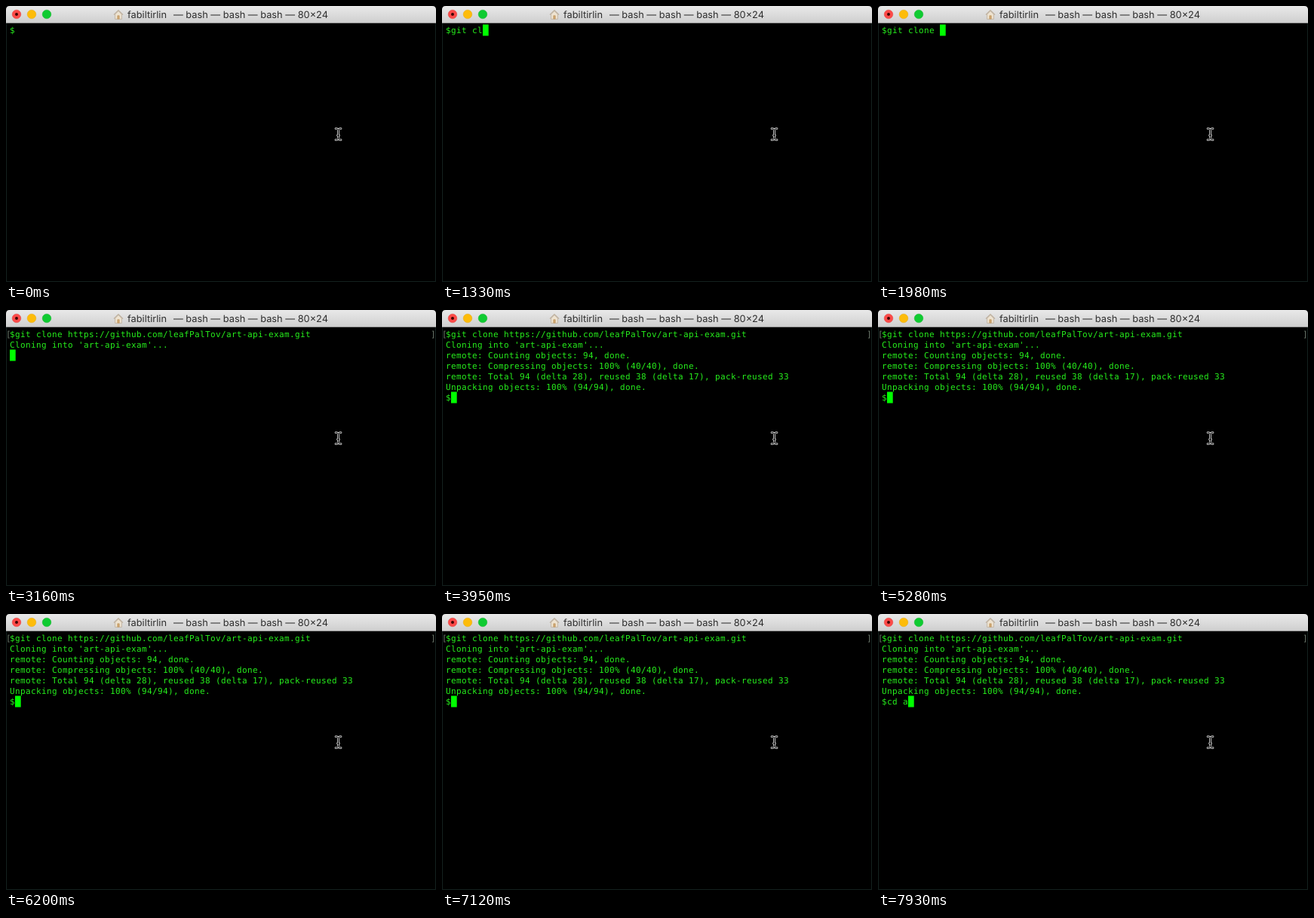
Recreate the animation shown at these times as an HTML page. Size 570 by 366 pixels, loop 8 s.

```html
<!DOCTYPE html>
<html lang="en">
<head>
<meta charset="utf-8">
<title>Terminal</title>
<style>
  html, body { margin: 0; width: 100%; height: 100%; overflow: hidden; background: #000; }
  svg { display: block; }
  text { white-space: pre; text-rendering: geometricPrecision; }
  .title { font: 12.8px Inter, Roboto, sans-serif; fill: #2e2e2e; }
  .term { font: 11px "DejaVu Sans Mono", monospace; letter-spacing: .378px; fill: #26ee1c; }
  .mark { fill: #707c70; }
</style>
</head>
<body>
<svg width="570" height="366" viewBox="0 0 570 366">
  <defs>
    <linearGradient id="bar" x1="0" y1="0" x2="0" y2="1">
      <stop offset="0" stop-color="#e9e9e9"/>
      <stop offset="1" stop-color="#cfcfcf"/>
    </linearGradient>
    <path id="beam" d="M437 162.5Q440.5 162.3 440.5 165Q440.5 162.3 444 162.5M440.5 165V175M437 177.5Q440.5 177.7 440.5 175Q440.5 177.7 444 177.5M439.5 171.5H441.5"/>
  </defs>
  <rect width="570" height="366"/>
  <path d="M.5 22V365.5H569.5V22" fill="none" stroke="#14211e"/>
  <path d="M0 22V5Q0 0 5 0H565Q570 0 570 5V22Z" fill="url(#bar)"/>
  <path d="M0 22.5H570" stroke="#8c8c8c"/>

  <g stroke-width=".5">
    <circle cx="14" cy="11" r="5.8" fill="#fc4a48" stroke="#e2423f"/>
    <circle cx="34" cy="11" r="5.8" fill="#fdbc0a" stroke="#e6a80f"/>
    <circle cx="54" cy="11" r="5.8" fill="#0fcb31" stroke="#14b52d"/>
  </g>
  <circle cx="14" cy="11" r="2" fill="#3f0403"/>

  <g stroke="#b9ad9e" stroke-width=".8" stroke-linejoin="round">
    <path d="M144.6 11V17.4H153.4V11L149 6.6Z" fill="#eee3d0"/>
    <path d="M142.9 11.6L149 5.6L155.1 11.6" fill="none" stroke="#bdae9b" stroke-width="1.1"/>
    <path d="M147.8 17.2V12.8H150.2V17.2Z" fill="#cfa56c" stroke="#c39f70"/>
  </g>
  <text class="title" x="161" y="16">fabiltirlin</text>
  <text class="title" x="427" y="16" text-anchor="end">— bash — bash — bash — 80×24</text>

  <g id="marks" class="term">
    <text class="mark" x="0" y="36">[</text>
    <text class="mark" x="563" y="36">]</text>
  </g>
  <g id="lines" class="term"></g>
  <rect id="caret" width="7.7" height="15" fill="#00ff00"/>

  <g fill="none" stroke-linecap="round" stroke-linejoin="round">
    <use href="#beam" stroke="#e4e4e4" stroke-width="2.7"/>
    <use href="#beam" stroke="#000" stroke-width="1"/>
  </g>
</svg>
<script>
const LOOP = 8000, COL = 7, ROW = 14, LEFT = 5, TOP = 25;
const clone = 'git clone https://github.com/leafPalTov/art-api-exam.git';
const change = 'cd a';

// [time, characters typed so far]
const cloneKeys = [[400, 1], [530, 2], [660, 3], [1060, 4], [1330, 6],
  [1590, 7], [1720, 8], [1850, 9], [1980, 10], [2500, clone.length]];
const cdKeys = [[7390, 1], [7520, 2], [7660, 3], [7930, 4]];

// [time, line printed]
const output = [
  [3160, "Cloning into 'art-api-exam'..."],
  [3700, 'remote: Counting objects: 94, done.'],
  [3700, 'remote: Compressing objects: 100% (40/40), done.'],
  [3700, 'remote: Total 94 (delta 28), reused 38 (delta 17), pack-reused 33'],
  [3830, 'Unpacking objects: 100% (94/94), done.']
];
const CARET_ON = 260, RUN = 3160, PROMPT = 3950;

const byId = id => document.getElementById(id);
const caret = byId('caret'), marks = byId('marks');

const rows = Array.from({ length: 7 }, (_, i) => {
  const row = document.createElementNS('http://www.w3.org/2000/svg', 'text');
  row.setAttribute('x', LEFT);
  row.setAttribute('y', TOP + 11 + i * ROW);
  byId('lines').append(row);
  return row;
});

function typed(text, keys, t) {
  const count = keys.reduce((n, [at, k]) => t >= at ? k : n, 0);
  return '$' + text.slice(0, count);
}

function screen(t) {
  const lines = [typed(clone, cloneKeys, t)];
  for (const [at, line] of output) if (t >= at) lines.push(line);
  if (t >= PROMPT) lines.push(typed(change, cdKeys, t));
  else if (t >= RUN) lines.push('');
  return lines;
}

function show(node, on) {
  node.setAttribute('visibility', on ? 'visible' : 'hidden');
}

function draw(t) {
  const lines = screen(t), last = lines.length - 1;
  rows.forEach((row, i) => {
    const text = lines[i] || '';
    if (row.textContent !== text) row.textContent = text;
  });
  caret.setAttribute('x', LEFT + lines[last].length * COL);
  caret.setAttribute('y', TOP - .5 + last * ROW);
  show(caret, t >= CARET_ON);
  show(marks, t >= RUN);
}

const start = performance.now();
function tick() {
  draw((performance.now() - start) % LOOP);
  requestAnimationFrame(tick);
}
draw(0);
requestAnimationFrame(tick);
</script>
</body>
</html>
```
